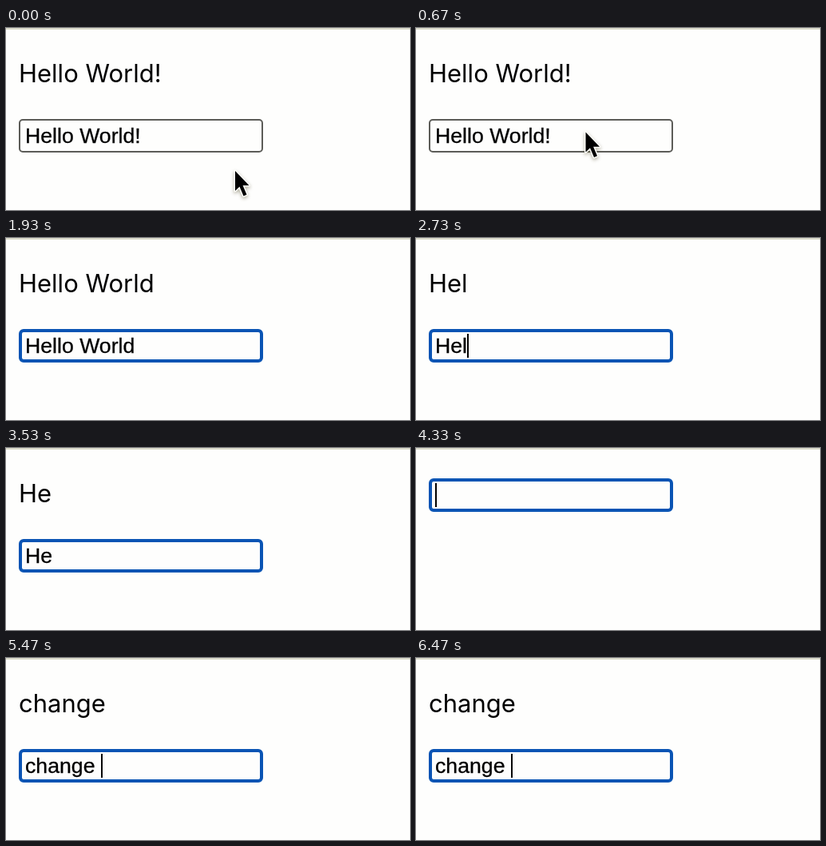
Recreate the animation shown at these times as an HTML page. Size 506 by 228 pixels, loop 6.67 s.

```html
<!DOCTYPE html>
<html lang="en">
<head>
<meta charset="utf-8">
<title>Bound text field</title>
<style>
  html, body { margin: 0; width: 100%; height: 100%; overflow: hidden; background: #fefefd; }
  body { position: relative; color: #000; }
  body > * { position: absolute; box-sizing: border-box; white-space: pre; }
  #rule { left: 0; top: 0; width: 100%; height: 2px; background: #dadacb; }
  #heading { left: 16px; top: 38px; font: 31px/37px Inter, sans-serif; }
  #field { left: 16px; top: 114px; width: 306px; height: 42px; border: 2px solid #5c5c58; border-radius: 5px; }
  #field.focused { border: 4px solid #0a54b4; border-radius: 6px; }
  #line { left: 24px; top: 120px; height: 30px; font: 26.667px/30px "Liberation Sans", Arial, sans-serif; }
  #value { -webkit-text-stroke: .3px #000; }
  #caret { position: absolute; left: 100%; top: 0; width: 2px; height: 30px; background: #000; }
  #cursor { left: 0; top: 0; overflow: visible; filter: drop-shadow(0 2px 2px rgba(90, 85, 50, .45)); }
</style>
</head>
<body>
<div id="rule"></div>
<div id="heading"></div>
<div id="field"></div>
<div id="line"><span id="value"></span><i id="caret"></i></div>
<svg id="cursor" width="20" height="34">
  <path d="M0 0V25L5.5 19.8L10.5 31.5L14.5 29.7L9.6 18.3H17.5Z"
        fill="#000" stroke="#fffffa" stroke-width="3" stroke-linejoin="round" paint-order="stroke"/>
</svg>
<script>
const LOOP = 6670, FOCUS = 1470, BLINK = 500;
const GREETING = "Hello World!", WORD = "change ";
const $ = id => document.getElementById(id);

// Times of each key press
const erase = [1530, 2070, 2130, 2270, 2330, 2470, 2530, 2600, 2730, 2870, 3730, 3930];
const type = [4870, 4970, 5070, 5170, 5240, 5330, 5430];
const keys = [FOCUS - 60, ...erase, ...type];

// Pointer stops: time, x, y
const stops = [[70, 287, 179], [670, 212.5, 130.5], [800, 212.5, 130.5], [1400, 207, 126]];

const countPast = (times, t) => times.filter(k => k <= t).length;
const ease = p => p * p * (3 - 2 * p);

function textAt(t) {
  const typed = countPast(type, t);
  return typed ? WORD.slice(0, typed) : GREETING.slice(0, GREETING.length - countPast(erase, t));
}

function caretOn(t) {
  if (t < FOCUS) return false;
  const n = countPast(keys, t);
  // The first blink still follows the click
  const since = t - (n <= 2 ? keys[0] : keys[n - 1]);
  return Math.floor(since / BLINK) % 2 === 0;
}

function pointerAt(t) {
  if (t <= stops[0][0]) return stops[0].slice(1);
  for (let i = 1; i < stops.length; i++) {
    const [t0, x0, y0] = stops[i - 1], [t1, x1, y1] = stops[i];
    if (t < t1) {
      const p = ease((t - t0) / (t1 - t0));
      return [x0 + (x1 - x0) * p, y0 + (y1 - y0) * p];
    }
  }
  return stops[stops.length - 1].slice(1);
}

function draw(t) {
  const text = textAt(t), lift = text ? "" : "translateY(-76px)";
  const [x, y] = pointerAt(t);
  $("heading").textContent = $("value").textContent = text;
  $("field").className = t >= FOCUS ? "focused" : "";
  $("field").style.transform = $("line").style.transform = lift;
  $("caret").style.visibility = caretOn(t) ? "visible" : "hidden";
  $("cursor").style.visibility = t < FOCUS ? "visible" : "hidden";
  $("cursor").style.transform = `translate(${x}px, ${y}px)`;
}

const start = performance.now();
function tick() {
  draw((performance.now() - start) % LOOP);
  requestAnimationFrame(tick);
}
tick();
</script>
</body>
</html>
```
